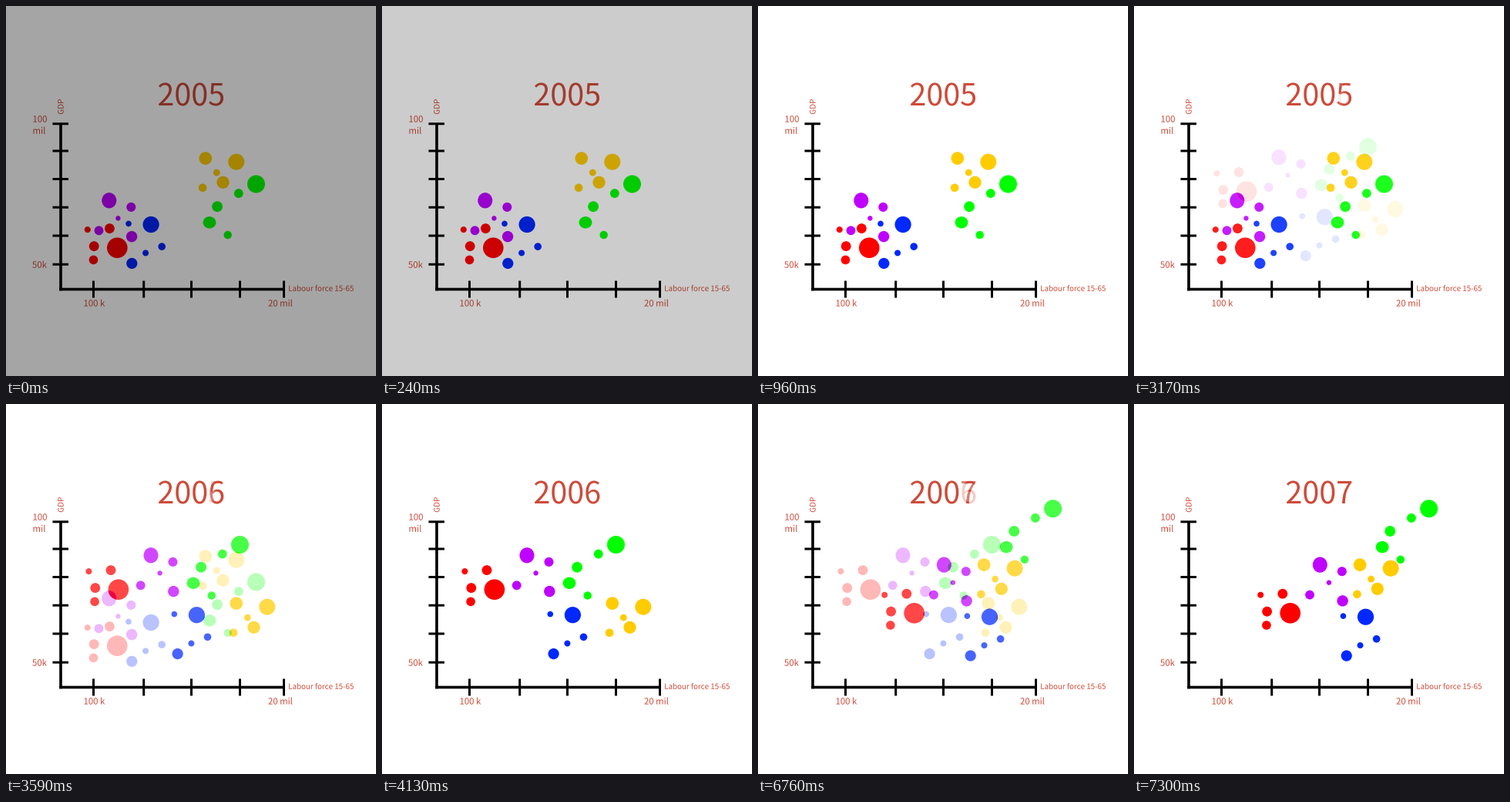
Animation, 480 px wide and 480 px high, one loop 8000 ms. Source, as a matplotlib script:

```python
import matplotlib.pyplot as plt
import numpy as np
from matplotlib.animation import FuncAnimation
from matplotlib.patches import Ellipse, PathPatch, Rectangle
from matplotlib.textpath import TextPath
from matplotlib.transforms import Affine2D

SIZE, LOOP, INTERVAL = 480, 8000, 20
STEP = 60                     # ms between fade steps
CUTS = (3170, 6340)           # start of each crossfade
FADE_STEPS = 17
INK = np.array((206, 74, 56)) / 255
FONT = {"family": ["Noto Sans CJK JP", "DejaVu Sans"]}
TITLE_X, TITLE_Y, TITLE_SIZE = 198, 129, 39.5

# colour, offsets per year, bubbles as (x, y, rx[, ry])
GROUPS = [
    ((255, 0, 0), [(0, 0), (1.6, -73), (58.4, -42.4)],
     [(105.8, 290.1, 4), (134.4, 288.6, 6.4), (114.2, 311.6, 6.4),
      (113.5, 329.4, 5.8), (144.3, 313.7, 13.3)]),
    ((191, 0, 255), [(0, 0), (54.2, -56), (107.5, -43.7)],
     [(133.8, 252.3, 9.5, 10.1), (162.3, 260.9, 6), (145.4, 275.4, 3.2),
      (120.5, 291.3, 5.9), (163.1, 299.1, 7.2)]),
    ((0, 40, 255), [(0, 0), (59.3, -9.8), (112.4, -7.3)],
     [(159, 282.4, 3.8), (188.1, 283.5, 10.6), (202.2, 312.1, 4.8),
      (181.1, 320.4, 4), (163.3, 333.9, 7.1)]),
    ((255, 204, 0), [(0, 0), (40, 61), (34.3, 11)],
     [(258.8, 197.6, 8.3), (298.8, 202.2, 10.5), (273.3, 216.1, 4.4),
      (281.5, 228.8, 8.1), (255.1, 235.8, 5.3)]),
    ((0, 255, 0), [(0, 0), (-21, -48.5), (58.1, -95.2)],
     [(324.5, 231, 11.5), (301.8, 243.1, 5.9), (274.1, 260.2, 6.9),
      (264, 280.8, 8.4, 7.7), (287.7, 297, 5.2)]),
]

fig = plt.figure(figsize=(SIZE / 100, SIZE / 100), dpi=100, facecolor="white")
ax = fig.add_axes([0, 0, 1, 1])
ax.set_xlim(0, SIZE)
ax.set_ylim(SIZE, 0)
ax.axis("off")


def outline(text, size):
    return TextPath((0, 0), text, size=size, prop=FONT)


def right(text):
    return outline(text, TITLE_SIZE).get_extents().x1


def label(text, x, y, size, angle=0):
    """Text whose ink starts at x, on baseline y."""
    path = outline(text, size)
    place = (Affine2D().translate(-path.get_extents().x0, 0).scale(1, -1)
             .rotate_deg(-angle).translate(x, y))
    ax.add_patch(PathPatch(place.transform_path(path), fc=INK, lw=0))


def bar(x0, y0, x1, y1):
    ax.add_patch(Rectangle((x0, y0), x1 - x0, y1 - y0, fc="black", lw=0,
                           snap=False))


def draw_chart():
    bar(69.2, 152, 72.8, 369.3)
    bar(69.2, 365.7, 361, 369.3)
    for y in (152.8, 188, 224.5, 261.2, 298, 335.2):
        bar(60.5, y - 1.5, 81, y + 1.5)
    for x in (113.5, 178.7, 240.5, 303.5, 360.5):
        bar(x - 1.5, 356.5, x + 1.5, 378.5)
    label("100", 35.5, 150.7, 11.4)
    label("mil", 35.5, 165.8, 11.4)
    label("50k", 34.3, 339.7, 11.4)
    label("100 k", 101.5, 389.6, 11.4)
    label("20 mil", 340.5, 389.6, 11.3)
    label("Labour force 15-65", 367.2, 369.8, 9.75)
    label("GDP", 74.6, 140.2, 10, angle=90)
    label("200", TITLE_X, TITLE_Y, TITLE_SIZE)


def last_digit(year):
    x = TITLE_X - outline("200", TITLE_SIZE).get_extents().x0
    x += 3 * (right("2000") - right("200"))
    place = Affine2D().scale(1, -1).translate(x, TITLE_Y)
    return place.transform_path(outline(str(5 + year), TITLE_SIZE))


def bubbles(year):
    for color, shifts, dots in GROUPS:
        dx, dy = shifts[year]
        for x, y, rx, *ry in dots:
            yield x + dx, y + dy, rx, (ry or [rx])[0], np.array(color) / 255


draw_chart()
digits = [last_digit(n) for n in range(3)]
years = [list(bubbles(n)) for n in range(3)]
shade = ax.add_patch(Rectangle((0, 0), SIZE, SIZE, fc="black", lw=0, zorder=9))
live = []


def put(patch, clip=None):
    ax.add_patch(patch)
    if clip is not None:
        patch.set_clip_path(clip)
    live.append(patch)
    return patch


def disc(bubble, color, clip=None):
    x, y, rx, ry, _ = bubble
    return put(Ellipse((x, y), 2 * rx, 2 * ry, fc=color, lw=0), clip)


def digit(year, color, clip=None):
    return put(PathPatch(digits[year], fc=color, lw=0), clip)


def tint(color, a):
    return 1 - a + color * a


def show_year(year, a):
    return [disc(b, tint(b[4], a)) for b in years[year]]


def crossfade(old, a):
    """Blend two years; overlaps get the exact mix of both colours."""
    new = old + 1
    show_year(old, 1 - a)
    fresh = show_year(new, a)
    for p in years[old]:
        for q, patch in zip(years[new], fresh):
            if np.hypot(p[0] - q[0], p[1] - q[1]) < p[3] + q[3]:
                disc(p, p[4] * (1 - a) + q[4] * a, patch)
    digit(old, tint(INK, 1 - a))
    top = digit(new, tint(INK, a))
    digit(old, INK, top)


def ease_out(x):
    return 1 - (1 - min(x, 1)) ** 2


def update(i):
    while live:
        live.pop().remove()
    t = i * INTERVAL + INTERVAL / 2
    shade.set_alpha(0.353 * (1 - ease_out(t // STEP / (FADE_STEPS - 1))))

    year = sum(t >= c for c in CUTS)
    a = 1
    if year:
        a = ease_out(((t - CUTS[year - 1]) // STEP + 1) / FADE_STEPS)
    if a < 1:
        crossfade(year - 1, a)
    else:
        show_year(year, 1)
        digit(year, INK)
    return live


anim = FuncAnimation(fig, update, frames=LOOP // INTERVAL, interval=INTERVAL,
                     init_func=lambda: [], repeat=True, repeat_delay=0)
plt.show()
```
